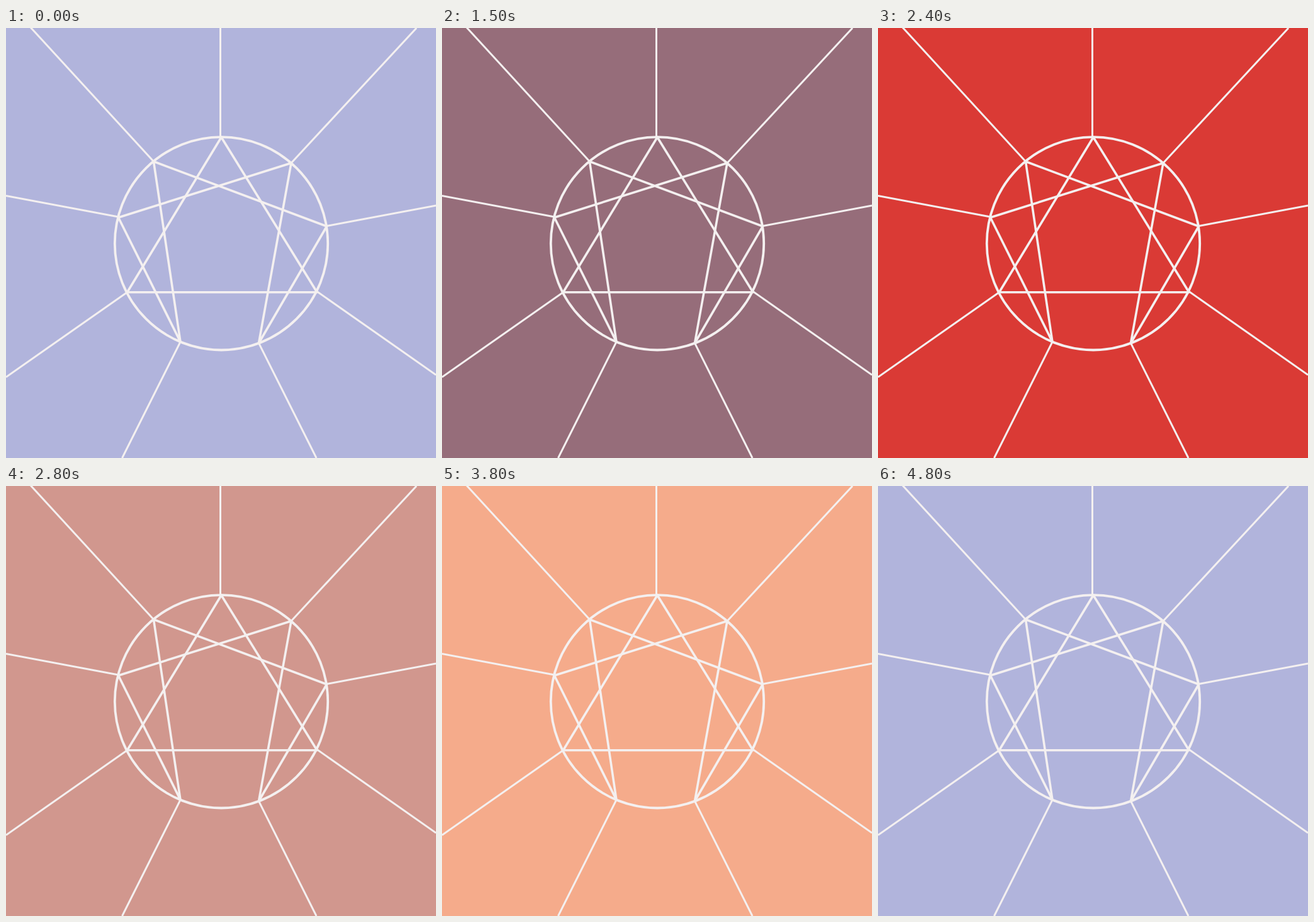
These frames come from a looping animation (683 by 683 pixels, 4900 ms). An HTML page:

```html
<!DOCTYPE html>
<html lang="en">
<head>
<meta charset="utf-8">
<title>Enneagram</title>
<style>
  html, body { margin: 0; width: 100%; height: 100%; overflow: hidden; background: #b1b4dc; }
  svg { display: block; width: 100%; height: 100%; }
</style>
</head>
<body>
<svg viewBox="0 0 683 683" fill="none" stroke="#f4f0f0" stroke-width="3.6" stroke-linejoin="round">
  <circle cx="342" cy="342.3" r="169.2" stroke-width="3.8"/>
  <path d="M342 173.5L192.5 419.8H494Z"/>
  <path d="M234.5 212L509.5 315L401.5 500.5L453 214.5L178.5 301L277 498.5Z"/>
  <path stroke-width="3" d="M340.5 0V173M652 0L453 214.5M683 282L509.5 314.5M683 551L494 418.5
    M493 683L401.5 500.5M184.5 683L277 498.5M0 554.5L192.5 419.8M0 266.5L178.5 300M39 -1L234.5 212"/>
</svg>
<script>
  const LOOP = 4900, STEP = 100, FADE = 600;
  const colors = [
    [177, 180, 220], // lavender
    [104, 146, 142], // green
    [74, 110, 172],  // blue
    [226, 108, 72],  // orange
    [218, 58, 53],   // red
    [205, 198, 187], // stone
    [245, 168, 181], // pink
    [244, 177, 54],  // yellow
  ];

  function colorAt(time) {
    const pos = Math.floor(time / STEP) * STEP / FADE;
    const i = Math.floor(pos);
    const from = colors[i % colors.length], to = colors[(i + 1) % colors.length];
    return `rgb(${from.map((c, k) => Math.round(c + (to[k] - c) * (pos - i)))})`;
  }

  const start = performance.now();
  function draw() {
    document.body.style.background = colorAt((performance.now() - start) % LOOP);
    requestAnimationFrame(draw);
  }
  draw();
</script>
</body>
</html>
```
